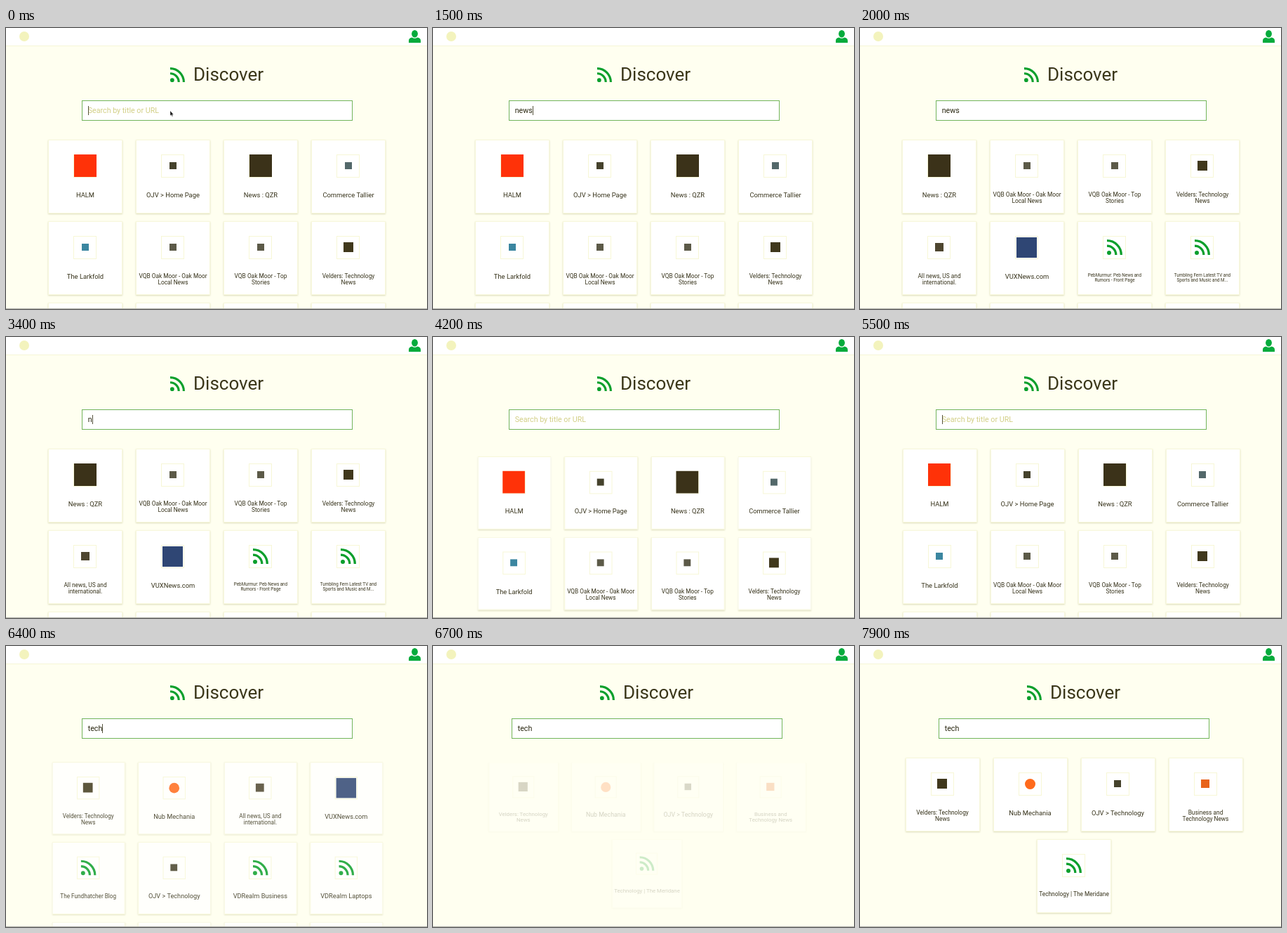
An HTML page that plays this animation: 600 px wide and 400 px high, repeating every 8 s.

```html
<!DOCTYPE html>
<html lang="en">
<head>
<meta charset="utf-8">
<title>Discover</title>
<style>
  html, body { margin: 0; width: 100%; height: 100%; overflow: hidden; }
  body { background: #fffff0; font-family: Roboto, Arial, sans-serif; color: #36321a; }
  #stage { position: relative; width: 600px; height: 400px; overflow: hidden; }
  #stage > *, #page > *, .card > *, #field > * { position: absolute; }
  #page { inset: 0; }
  header { left: 0; top: 0; width: 600px; height: 25px; background: #fff; border-bottom: 1px solid #f5f5d6; }
  .brand { left: 19px; top: 5px; width: 14px; height: 14px; border-radius: 50%; background: #f3f3bd; }
  .person { left: 574px; top: 3px; fill: #05ab3c; }
  .footline { left: 0; top: 399px; width: 600px; height: 1px; background: #b4b4ac; }
  .feed { fill: none; stroke: #0b9f2c; stroke-width: 3.3; overflow: visible; }
  .feed circle { fill: #0b9f2c; stroke: none; }
  h1 { margin: 0; left: 267px; top: 51px; font: 400 26px/31px Roboto, Arial, sans-serif; color: #3a361a; }
  #field { left: 108px; top: 103px; width: 385.5px; height: 28.5px; box-sizing: border-box;
    background: #fff; border: 1px solid #72b45c; }
  #text { left: 7.7px; top: 6.5px; font-size: 10.7px; line-height: 14px; white-space: pre; }
  #caret { top: 7px; width: 1px; height: 13px; background: #55533c; }
  .grid { left: 50.5px; top: 159px; width: 500px; display: flex; flex-wrap: wrap; justify-content: center; }
  .card { position: relative; width: 106px; height: 105px; margin: 0 9.5px 11px; background: #fff;
    box-shadow: inset 0 0 0 1px #f8f8dc, 0 1px 2px rgba(130, 130, 50, .28); }
  .thumb { left: 36px; top: 20.5px; width: 33px; height: 33px; box-sizing: border-box; border: 1px solid #f7f7d6; }
  .card .feed { left: 42px; top: 26px; }
  .label { left: 0; top: 73.5px; width: 106px; line-height: 1.15; text-align: center; white-space: pre; }
</style>
</head>
<body>
<div id="stage">
  <div id="page">
    <svg class="feed" style="left:233.5px;top:56px" width="21" height="21" viewBox="0 0 22 22"></svg>
    <h1>Discover</h1>
    <div id="field"><span id="text"></span><i id="caret"></i></div>
  </div>
  <header></header>
  <div class="brand"></div>
  <svg class="person" width="17" height="18" viewBox="0 0 17 18">
    <ellipse cx="8.5" cy="5.3" rx="4.4" ry="5.2"/>
    <path d="M0 18V15Q0 11.5 4.8 10.6Q8.5 13 12.2 10.6Q17 11.5 17 15V18Z"/>
  </svg>
  <svg id="mouse" style="left:233px;top:117px" width="8" height="11" viewBox="0 0 8 11">
    <path d="M1 .7V8L2.6 6.6L3.7 9L4.8 8.5L3.8 6.2H5.8Z" fill="#111" stroke="#fff" stroke-width=".4"/>
  </svg>
  <div class="footline"></div>
</div>
<script>
const LOOP = 8000, STEP = 100, BLINK = 500;
const $ = id => document.getElementById(id);
const FEED = '<circle cx="3" cy="19" r="3"/><path d="M0 9.2A12.8 12.8 0 0 1 12.8 22M0 1.7A20.3 20.3 0 0 1 20.3 22"/>';

// label, mark colour, mark size, round; no colour means the feed icon
const tile = {
  halm: ['HALM', '#ff3208', 32],
  home: ['OJV > Home Page', '#45422c', 10],
  radio: ['News : QZR', '#3b3219', 32],
  trade: ['Commerce Tallier', '#53686a', 10],
  lark: ['The Larkfold', '#3b86a0', 10],
  local: ['VQB Oak Moor - Oak Moor\nLocal News', '#5c5a48', 10],
  top: ['VQB Oak Moor - Top\nStories', '#5c5a48', 10],
  velders: ['Velders: Technology\nNews', '#40381c', 14],
  abroad: ['All news, US and\ninternational.', '#4e4630', 12],
  vux: ['VUXNews.com', '#2f4674', 29],
  peb: ['PebMurmur: Peb News and\nRumors - Front Page'],
  fern: ['Tumbling Fern Latest TV and\nSports and Music and M...'],
  nub: ['Nub Mechania', '#ff6a1c', 15, true],
  fund: ['The Fundhatcher Blog'],
  ojvTech: ['OJV > Technology', '#45422c', 10],
  vdBiz: ['VDRealm Business'],
  vdLap: ['VDRealm Laptops'],
  gate: ['Business and\nTechnology News', '#e8641c', 12],
  meridane: ['Technology | The Meridane']
};

// start in ms, scale centre below the grid top, tiles
const lists = [
  [-1000, 1000, 'halm home radio trade lark local top velders'],
  [1600, 600, 'radio local top velders abroad vux peb fern'],
  [4000, 1000, 'halm home radio trade lark local top velders'],
  [6250, 325, 'velders nub abroad vux fund ojvTech vdBiz vdLap'],
  [6700, 111, 'velders nub ojvTech gate meridane']
].map(([start, pivot, names]) => {
  const ids = names.split(' ');
  const el = document.createElement('div');
  el.className = 'grid';
  el.style.transformOrigin = `250px ${pivot}px`;
  el.innerHTML = ids.map(id => card(...tile[id])).join('') +
    (ids.length === 8 ? '<div class="card"></div>'.repeat(4) : '');
  $('page').append(el);
  return { start, el };
});

// start in ms, field text
const typing = [
  [0, ''], [900, 'n'], [1000, 'ne'], [1200, 'new'], [1300, 'news'],
  [3200, 'new'], [3300, 'ne'], [3400, 'n'], [3500, ''],
  [5800, 't'], [5900, 'te'], [6000, 'tec'], [6100, 'tech']
];

document.querySelectorAll('.feed').forEach(svg => svg.innerHTML = FEED);

function card(label, color, size, round) {
  const pixels = label.length <= 17 ? 9.4 : label.length <= 40 ? 8.35 : 6.3;
  const edge = 52.5 - size / 2, rise = 37 - size / 2;
  const mark = color
    ? `<div style="left:${edge}px;top:${rise}px;width:${size}px;height:${size}px;background:${color};border-radius:${round ? '50%' : 0}"></div>`
    : '<svg class="feed" width="22" height="22" viewBox="0 0 22 22"></svg>';
  return `<div class="card"><div class="thumb"></div>${mark}<div class="label" style="font-size:${pixels}px">${label.replace('>', '&gt;')}</div></div>`;
}

function drawField(t) {
  const [since, value] = typing.filter(k => k[0] <= t).pop();
  const text = $('text');
  text.textContent = value || 'Search by title or URL';
  text.style.color = value ? '#28260f' : '#d2cf86';
  const end = value ? text.getBoundingClientRect().width : 0;
  $('caret').style.left = 7.7 + end + 'px';
  $('caret').style.opacity = Math.floor((t - since) / BLINK) % 2 ? 0 : 1;
  $('mouse').style.display = t < typing[1][0] ? '' : 'none';
}

function drawLists(t) {
  const current = lists.filter(l => l.start <= t).pop();
  for (const l of lists) l.el.style.display = l === current ? '' : 'none';
  const u = Math.min(1, (t - current.start) / 350);
  current.el.style.transform = `scale(${1 - 0.06 * (1 - u) ** 2})`;
  current.el.style.opacity = Math.min(1, 0.2 + 1.5 * u);
  // the short list needs no scrollbar, so the page recentres
  $('page').style.transform = current === lists[4] ? 'translateX(4px)' : '';
}

const begin = performance.now();
function draw() {
  const t = Math.floor(((performance.now() - begin) % LOOP) / STEP) * STEP;
  drawField(t);
  drawLists(t);
  requestAnimationFrame(draw);
}
draw();
</script>
</body>
</html>
```
